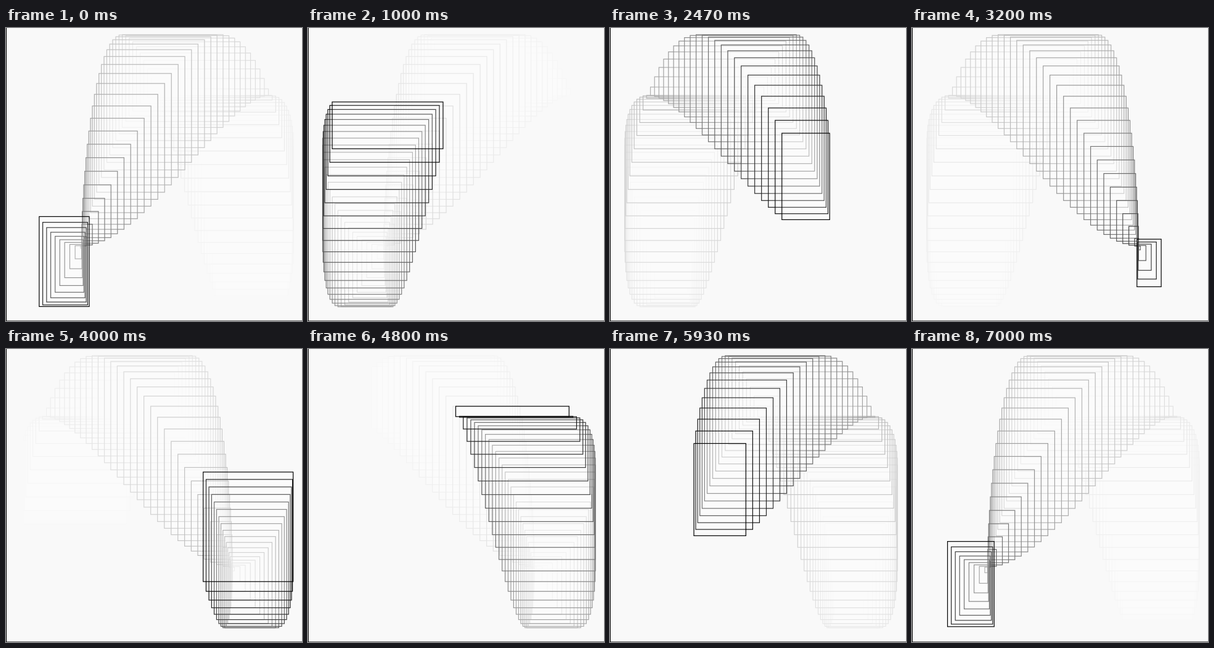
Recreate the animation shown at these times as an HTML page with a canvas. Size 480 px wide and 476 px high, loop 7.07 s.

```html
<!DOCTYPE html>
<html lang="en">
<head>
<meta charset="utf-8">
<title>Orbiting rectangle</title>
<style>
  html, body { margin: 0; width: 100%; height: 100%; overflow: hidden; background: #f9f9f9; }
  canvas { display: block; }
</style>
</head>
<body>
<canvas id="stage" width="480" height="476"></canvas>
<script>
const ctx = document.getElementById('stage').getContext('2d');
const LOOP = 7070, TICK = 1000 / 15;
const BG = 249, TRAIL = 58, VEIL = 0.09;
const CX = 245, CY = 231.9, BIG = 221.1, SMALL = 122.6;

// Time in ms and number of steps drawn by then; the pace varies slightly.
const PACE = [[0, 0], [1000, 18], [1867, 34], [3200, 58], [4800, 86], [5933, 107], [7000, 125], [7070, 126]];

function stepAt(ms) {
  const t = Math.floor((ms + 4) / TICK) * TICK;
  let i = 0;
  while (i < PACE.length - 2 && t >= PACE[i + 1][0]) i++;
  const [t0, n0] = PACE[i], [t1, n1] = PACE[i + 1];
  return Math.round(n0 + (n1 - n0) * (t - t0) / (t1 - t0));
}

// The rectangle spanned by two opposite corners, each on its own orbit.
function rectAt(n) {
  const a = n * 0.05, b = n * 0.1;
  const x1 = CX - BIG * Math.cos(a - 0.526), y1 = CY + SMALL * Math.cos(b + 0.918);
  const x2 = CX - SMALL * Math.cos(a + 0.457), y2 = CY + BIG * Math.cos(b - 0.067);
  return [Math.min(x1, x2), Math.min(y1, y2), Math.abs(x2 - x1), Math.abs(y2 - y1)];
}

function draw(ms) {
  ctx.fillStyle = `rgb(${BG},${BG},${BG})`;
  ctx.fillRect(0, 0, 480, 476);
  ctx.fillStyle = `rgba(${BG},${BG},${BG},${VEIL})`;
  ctx.lineWidth = 1.2;
  const head = stepAt(ms);
  // Each rectangle veils what lies under it, and its outline fades with age.
  for (let age = TRAIL; age >= 0; age--) {
    const ink = Math.max(0, 1.05 * Math.pow(0.95, age) - 0.05);
    const g = Math.round(BG * (1 - ink));
    const box = rectAt(head - age);
    ctx.strokeStyle = `rgb(${g},${g},${g})`;
    ctx.fillRect(...box);
    ctx.strokeRect(...box);
  }
  ctx.fillStyle = '#666';
  ctx.fillRect(0, 475, 480, 1);
  ctx.fillStyle = '#000';
  ctx.fillRect(0, 0, 1, 476);
}

const start = performance.now();
function frame() {
  draw((performance.now() - start) % LOOP);
  requestAnimationFrame(frame);
}
frame();
</script>
</body>
</html>
```
